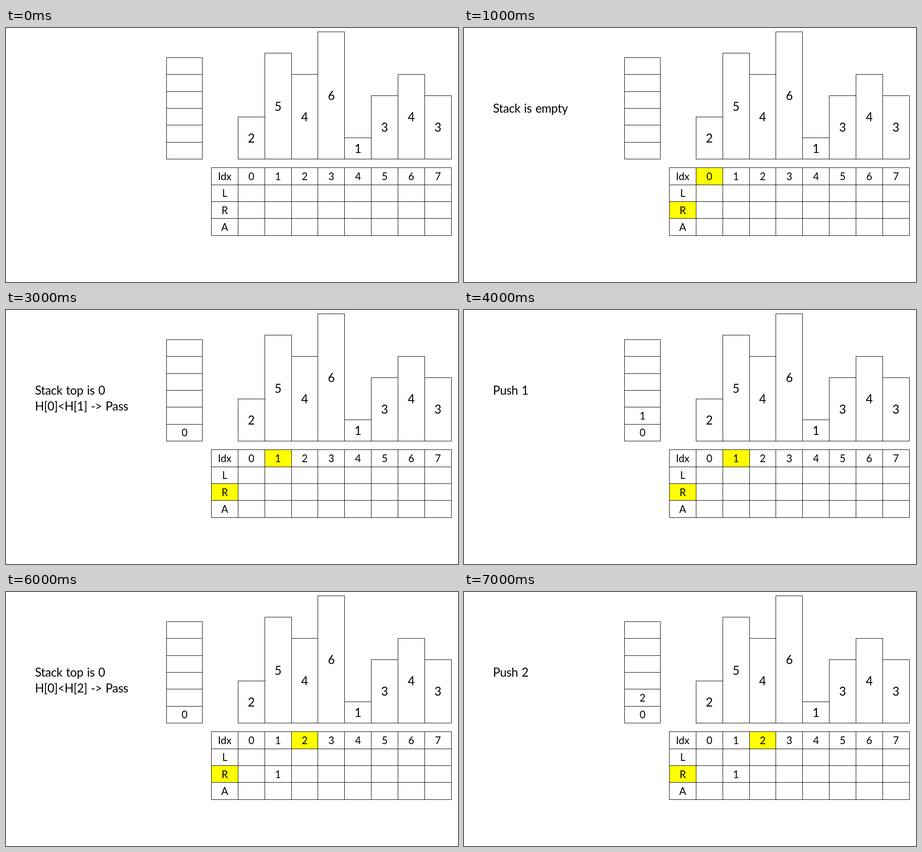
These frames come from a looping animation (998x561 px, 8000 ms). An HTML page with a canvas:

```html
<!DOCTYPE html>
<html>
<head>
<meta charset="utf-8">
<style>
html, body { margin: 0; height: 100%; overflow: hidden; background: #fff; }
canvas { display: block; }
</style>
</head>
<body>
<canvas id="stage" width="998" height="561"></canvas>
<script>
const ctx = document.getElementById('stage').getContext('2d');
const HEIGHTS = [2, 5, 4, 6, 1, 3, 4, 3];
const ROWS = ['Idx', 'L', 'R', 'A'];
const COL = 58.85, ROW = 37.4, UNIT = 46.8, BASE = 289.6;
const TABLE_X = 453.5, TABLE_Y = 308.7, BARS_X = TABLE_X + COL;
const STACK_X = 354.6, STACK_W = 79.2;

// One step per second: message lines, stack, active index, whether R[1] is known
const STEPS = [
  { lines: [], stack: [] },
  { lines: ['Stack is empty'], stack: [], active: 0 },
  { lines: ['Push 0'], stack: [0], active: 0 },
  { lines: ['Stack top is 0', 'H[0]<H[1] -> Pass'], stack: [0], active: 1 },
  { lines: ['Push 1'], stack: [0, 1], active: 1 },
  { lines: ['Stack top is 1', 'H[1]>H[2]', 'R[1]=2-1', 'Pop 1'], stack: [0], active: 2, solved: true },
  { lines: ['Stack top is 0', 'H[0]<H[2] -> Pass'], stack: [0], active: 2, solved: true },
  { lines: ['Push 2'], stack: [0, 2], active: 2, solved: true }
];

// Edges snap down to whole pixels so neighbours share one crisp line
function box(x, y, w, h, fill = '#fff') {
  const snap = v => Math.floor(v + 1e-6);
  const left = snap(x), top = snap(y);
  const rect = [left + .5, top + .5, snap(x + w) - left, snap(y + h) - top];
  ctx.fillStyle = fill;
  ctx.fillRect(...rect);
  ctx.strokeRect(...rect);
}

function label(text, x, y, size, align = 'center') {
  ctx.font = `${size}px Lato, sans-serif`;
  ctx.textAlign = align;
  ctx.fillStyle = '#000';
  ctx.fillText(text, x, y);
}

function cell(x, y, w, text, fill) {
  box(x, y, w, ROW, fill);
  label(text, x + w / 2, y + 27, 22.5);
}

function draw({ lines, stack, active, solved }) {
  ctx.fillStyle = '#fff';
  ctx.fillRect(0, 0, 998, 561);
  ctx.strokeStyle = '#000';
  ctx.lineWidth = 1;
  ctx.letterSpacing = '0px';
  ctx.wordSpacing = '0px';

  HEIGHTS.forEach((value, i) => {
    const x = BARS_X + i * COL, h = value * UNIT;
    box(x, BASE - h, COL, h);
    label(value, x + COL / 2, BASE - h / 2 + 10, 26.4);
  });

  for (let i = 0; i < 6; i++) {
    cell(STACK_X, BASE - (i + 1) * ROW, STACK_W, stack[i] ?? '');
  }

  ROWS.forEach((name, r) => {
    const y = TABLE_Y + r * ROW;
    const on = active !== undefined;
    cell(TABLE_X, y, COL, name, on && name === 'R' ? '#ff0' : '#fff');
    HEIGHTS.forEach((_, i) => {
      const text = r === 0 ? i : solved && name === 'R' && i === 1 ? 1 : '';
      cell(BARS_X + i * COL, y, COL, text, r === 0 && i === active ? '#ff0' : '#fff');
    });
  });

  ctx.letterSpacing = '-0.35px';
  ctx.wordSpacing = '1.6px';
  lines.forEach((line, i) => label(line, 64, 187.4 + i * 35, 26.4, 'left'));
}

function frame() {
  draw(STEPS[Math.floor(performance.now() / 1000) % STEPS.length]);
  requestAnimationFrame(frame);
}
frame();
</script>
</body>
</html>
```
